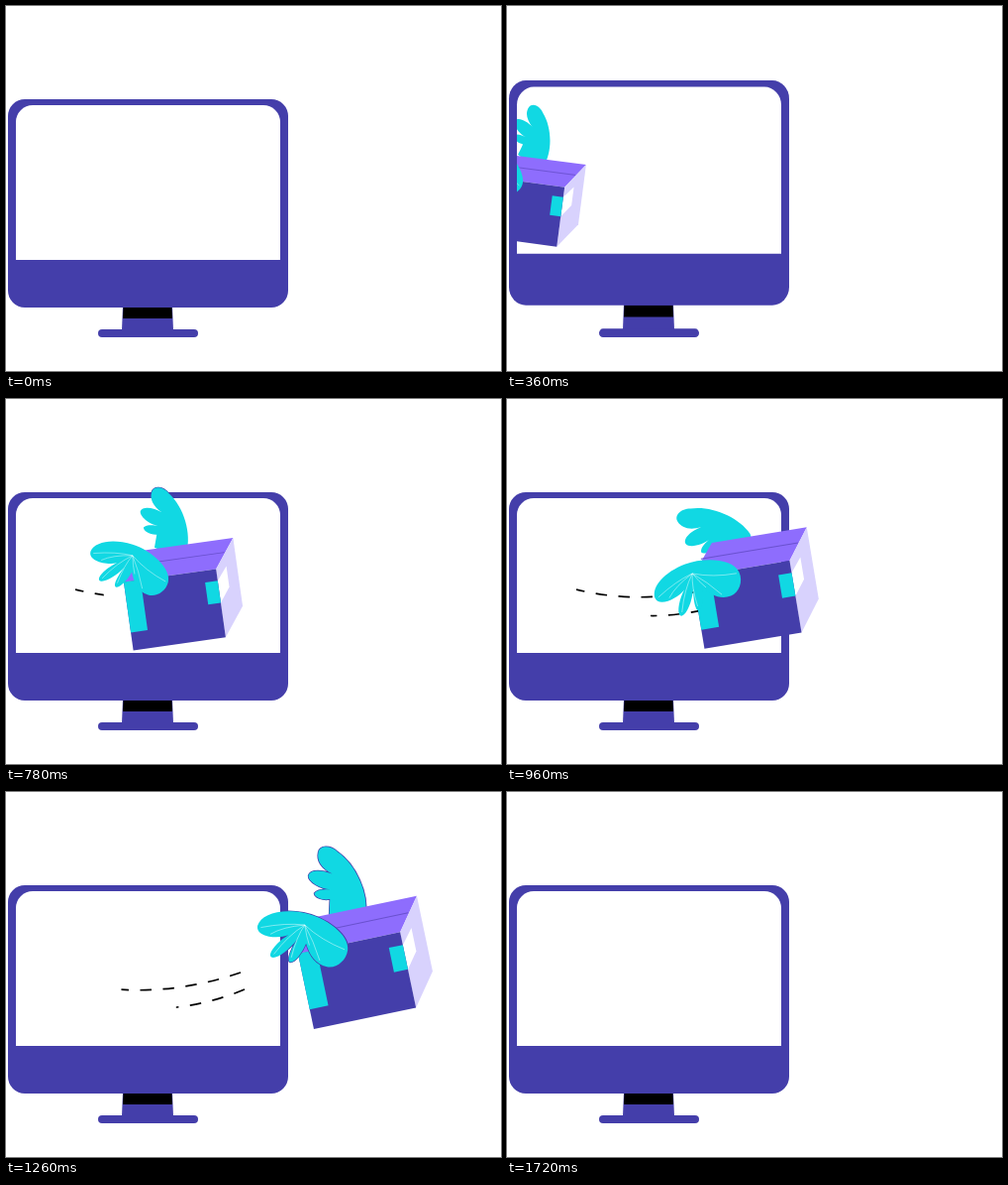
An HTML page with a canvas that plays this animation: 500x368 px, repeating every 2.4 s.

```html
<!DOCTYPE html>
<html lang="en">
<head>
<meta charset="utf-8">
<title>Winged parcel</title>
<style>
  html, body { margin: 0; width: 100%; height: 100%; overflow: hidden; background: #fff; }
  canvas { display: block; width: 500px; height: 368px; }
</style>
</head>
<body>
<canvas id="stage"></canvas>
<script>
const W = 500, H = 368, LOOP = 2400;
const INDIGO = '#443eaa', VIOLET = '#8e6dfd', LILAC = '#d8d2fd', CYAN = '#11d8e3';

const canvas = document.getElementById('stage');
const ctx = canvas.getContext('2d');
const dpr = window.devicePixelRatio || 1;
canvas.width = W * dpr;
canvas.height = H * dpr;

const REAR_WING = new Path2D('M-38.5-43C-39-49-31-52-23-48C-5-42 12-22 14.5-4L13 4L-15 4C-16 0-17-4-18-8C-24-5-31-6-32-9C-31-13-24-15-20-16C-28-14-40-17-41-22C-41-28-30-30-22-29C-32-31-38-36-38.5-43Z');
const FRONT_WING = new Path2D('M-63-7C-62-17-47-25-27-25C-8-25 15-14 15.5-1C16 8 9 16 1 16C-9 16-16 8-20 0C-22 9-26 17-30 18C-34 18-31 5-28-2C-33 8-41 17-46 17C-51 16-45 4-36-4C-44 1-63 3-63-7Z');
const VEINS = new Path2D('M-24-15Q-40-14-60-6M-24-15Q-42-10-51-2M-24-15Q-36-4-45 14M-24-15Q-29-4-30 14M-24-15Q-21-6-17 1M-24-15Q-14-3-6 12M-24-15Q-8-5 13-1');

const OUTSIDE = new Path2D();
OUTSIDE.rect(0, 0, W, H);
OUTSIDE.roundRect(2, 94, 283, 210, 17);

// Both trails run from the parcel end back to the screen
const TRAILS = [
  { path: new Path2D('M237 182C185 200 125 206 70 192'), from: 70, to: 238 },
  { path: new Path2D('M241 199C210 212 175 219 144 218.5'), from: 145, to: 242 }
];

const rad = deg => deg * Math.PI / 180;
const clamp = u => Math.min(1, Math.max(0, u));
const smooth = u => u * u * (3 - 2 * u);
const ramp = (t, a, b) => smooth(clamp((t - a) / (b - a)));

const stretch = t => 1 + 0.079 * (ramp(t, 140, 360) - ramp(t, 445, 710));
const flap = t => 36 - 29 * Math.cos((t - 800) / 422 * 2 * Math.PI);

// Front face centre, tilt and size; s is seconds from mid-screen
function flight(t) {
  const s = (t - 780) / 1000;
  const grown = 1.07 + 0.33 * Math.min(s, 0.44);
  return {
    x: 170 + s * (400.7 + s * (18.4 - s * 111.8)),
    y: 212.5 - s * (17 + s * (66 - s * 10)),
    tilt: -8 - s * (s < 0 ? 37 : 8),
    size: grown * (1 - Math.pow(clamp((t - 1220) / 500), 1.7))
  };
}

function poly(fill, ...pts) {
  ctx.fillStyle = fill;
  ctx.beginPath();
  for (let i = 0; i < pts.length; i += 2) ctx.lineTo(pts[i], pts[i + 1]);
  ctx.closePath();
  ctx.fill();
}

function round(fill, x, y, w, h, r) {
  ctx.fillStyle = fill;
  ctx.beginPath();
  ctx.roundRect(x, y, w, h, r);
  ctx.fill();
}

function monitor(t) {
  ctx.save();
  ctx.translate(0, 334);
  ctx.scale(1, stretch(t));
  ctx.translate(0, -334);
  poly(INDIGO, 118, 303, 168, 303, 169, 327, 117, 327);
  poly('#000', 118.5, 304, 167.5, 304, 168, 315, 118, 315);
  round(INDIGO, 93, 326, 101, 8, 4);
  round(INDIGO, 2, 94, 283, 210, 17);
  round('#fff', 10, 100, 267, 156, [17, 17, 0, 0]);
  ctx.restore();
}

function trails(t) {
  const head = ramp(t, 660, 1120), tail = ramp(t, 1100, 1565);
  if (head <= tail) return;
  ctx.strokeStyle = '#000';
  ctx.lineWidth = 1.7;
  ctx.setLineDash([11.5, 11.5]);
  for (const { path, from, to } of TRAILS) {
    const span = to - from;
    ctx.save();
    ctx.beginPath();
    ctx.rect(from + span * tail, 150, span * (head - tail), 100);
    ctx.clip();
    ctx.stroke(path);
    ctx.restore();
  }
  ctx.setLineDash([]);
}

// Turns a wing about (x, y); (dx, dy) offsets its outline from that joint
function wing(path, x, y, deg, dx, dy, veins) {
  ctx.save();
  ctx.translate(x, y);
  ctx.rotate(rad(deg));
  ctx.translate(dx, dy);
  ctx.fillStyle = CYAN;
  ctx.fill(path);
  if (veins) {
    ctx.strokeStyle = 'rgba(255,255,255,.5)';
    ctx.lineWidth = 0.7;
    ctx.stroke(veins);
  }
  // Thin dark rim, seen only off the monitor
  const pose = ctx.getTransform();
  ctx.setTransform(dpr, 0, 0, dpr, 0, 0);
  ctx.clip(OUTSIDE, 'evenodd');
  ctx.setTransform(pose);
  ctx.globalCompositeOperation = 'destination-over';
  ctx.strokeStyle = INDIGO;
  ctx.lineWidth = 1.2;
  ctx.globalCompositeOperation = 'source-over';
  ctx.stroke(path);
  ctx.fill(path);
  if (veins) {
    ctx.strokeStyle = 'rgba(255,255,255,.5)';
    ctx.lineWidth = 0.7;
    ctx.stroke(veins);
  }
  ctx.restore();
}

function box() {
  poly(VIOLET, -44, -32.5, -22, -59.5, 64, -59.5, 44, -32.5);
  poly(LILAC, 44, -32.5, 64, -59.5, 64, 5.5, 44, 32.5);
  poly('#fff', 44, -21.5, 54, -34, 54, -14, 44, -0.5);
  poly(INDIGO, -44, -32.5, 44, -32.5, 44, 32.5, -44, 32.5);
  poly(CYAN, -44, -32.5, -28, -32.5, -28, 15.5, -44, 15.5);
  poly(CYAN, 32, -21.5, 44, -21.5, 44, -0.5, 32, -0.5);
  ctx.strokeStyle = '#6a51cf';
  ctx.lineWidth = 0.9;
  ctx.beginPath();
  ctx.moveTo(-34, -47);
  ctx.lineTo(54, -47);
  ctx.stroke();
}

function parcel(t) {
  const { x, y, tilt, size } = flight(t);
  if (t < 140 || size <= 0.001) return;
  const lean = flap(t);
  ctx.save();
  ctx.beginPath();
  ctx.rect(10, 0, W, H);
  ctx.clip();
  ctx.translate(x, y);
  ctx.rotate(rad(tilt));
  ctx.scale(size, size);
  wing(REAR_WING, 5, -51, 40 - lean, -3.5, -4);
  box();
  wing(FRONT_WING, -7, -28.5, 31.5 - 0.75 * lean, -10.6, 0.9, VEINS);
  ctx.restore();
}

function draw(t) {
  ctx.setTransform(dpr, 0, 0, dpr, 0, 0);
  ctx.fillStyle = '#fff';
  ctx.fillRect(0, 0, W, H);
  monitor(t);
  trails(t);
  parcel(t);
}

const start = performance.now();
function tick() {
  draw((performance.now() - start) % LOOP);
  requestAnimationFrame(tick);
}
tick();
</script>
</body>
</html>
```
